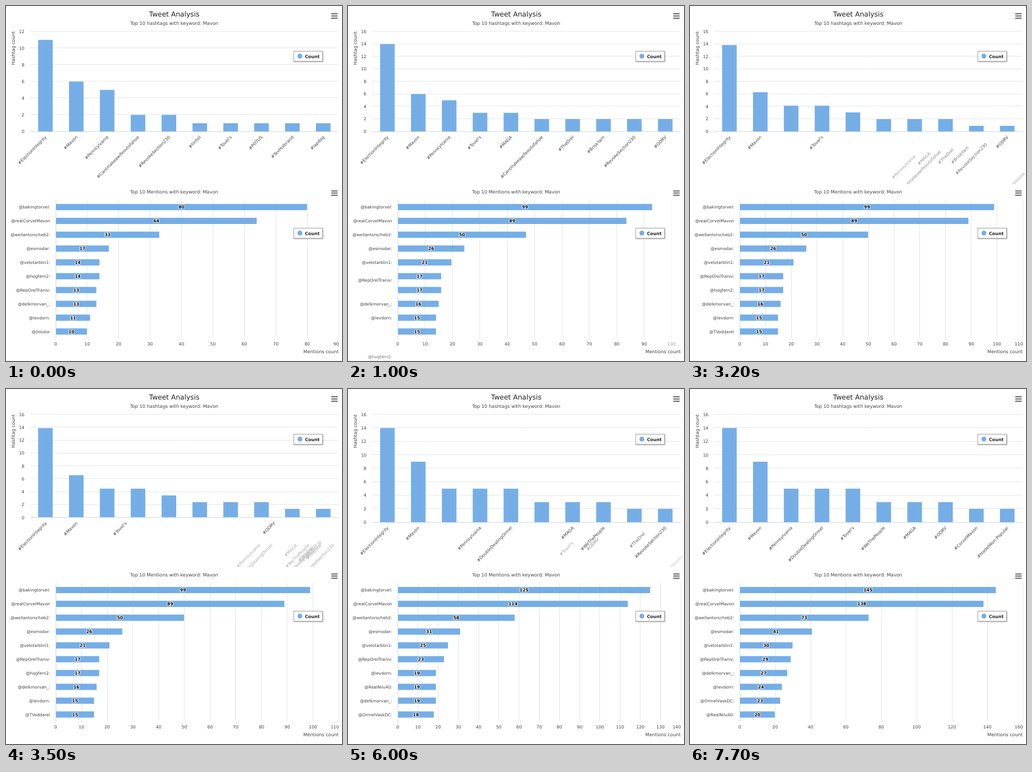
Write an HTML page with a canvas that moves like this. It is 608 by 640 pixels and loops after 8000 ms.

```html
<!DOCTYPE html>
<html lang="en">
<head>
<meta charset="utf-8">
<title>Tweet Analysis</title>
<style>
html, body { margin: 0; width: 100%; height: 100%; overflow: hidden; background: #fff; }
canvas { display: block; width: 608px; height: 640px; }
</style>
</head>
<body>
<canvas id="stage"></canvas>
<script>
const W = 608, H = 640, LOOP = 8000;
const BLUE = '#75aee7', GRID = '#e6e6e6', AXIS = '#ccd6eb', INK = '#404040';
const FONT = '"DejaVu Sans", Verdana, sans-serif';
const LEFT = 43.4, RIGHT = 602, TOP = 45.7, SLOT = (RIGHT - LEFT) / 10;
const ROW_LEFT = 90, ROW_TOP = 350, ROW = 24.93, ROW_END = 599;

const canvas = document.getElementById('stage');
const ctx = canvas.getContext('2d');
const dpr = window.devicePixelRatio || 1;
canvas.width = W * dpr;
canvas.height = H * dpr;

// Each state: labels, values, axis maximum and step; fresh labels re-enter instead of sliding.
const tags = [
  { names: '#ElectionIntegrity,#Mavon,#Pennsylvania,#Cantmakeawifeoutofahoe,#RevokeSection230,#tinfoil,#Tovel\'s,#POTUS,#TevHolbrand,#lapdog',
    values: [11, 6, 5, 2, 2, 1, 1, 1, 1, 1], max: 12, step: 2, base: 226 },
  { names: '#ElectionIntegrity,#Mavon,#Pennsylvania,#Tovel\'s,#MAGA,#Cantmakeawifeoutofahoe,#TheDrel,#BriskYarn,#RevokeSection230,#ODRV',
    values: [14, 6, 5, 3, 3, 2, 2, 2, 2, 2], max: 16, step: 2, base: 226 },
  { names: '#ElectionIntegrity,#Mavon,#Tovel\'s,#Pennsylvania,#DoubleDealingOrmel,#ODRV,#MAGA,#WeThePeople,#TheDrel,#RevokeSection230',
    values: [14, 7, 5, 5, 4, 3, 3, 3, 2, 2], max: 16, step: 2, base: 240,
    fresh: '#Pennsylvania,#MAGA,#TheDrel,#RevokeSection230' },
  { names: '#ElectionIntegrity,#Mavon,#Pennsylvania,#DoubleDealingOrmel,#Tovel\'s,#WeThePeople,#MAGA,#ODRV,#CorvelMavon,#HadelWon Popular',
    values: [14, 9, 5, 5, 5, 3, 3, 3, 2, 2], max: 16, step: 2, base: 240,
    fresh: '#Tovel\'s,#ODRV' }
];
const mentions = [
  { names: '@bakingtorvel:,@realCorvelMavon,@wellantorscheb2:,@esmodar:,@velotarblin1:,@hogfern2:,@RepOrelTraniv:,@delkmorvan_:,@levdorn:,@jhlodor',
    values: [80, 64, 33, 17, 14, 14, 13, 13, 11, 10], max: 90, step: 10 },
  { names: '@bakingtorvel:,@realCorvelMavon,@wellantorscheb2:,@esmodar:,@velotarblin1:,@RepOrelTraniv:,@hogfern2:,@delkmorvan_:,@levdorn:,@TVoddarel',
    values: [99, 89, 50, 26, 21, 17, 17, 16, 15, 15], max: 110, step: 10, fresh: '@hogfern2:' },
  { names: '@bakingtorvel:,@realCorvelMavon,@wellantorscheb2:,@esmodar:,@velotarblin1:,@RepOrelTraniv:,@levdorn:,@RealNilu40:,@delkmorvan_:,@OrmelVaskDC:',
    values: [125, 114, 58, 31, 25, 23, 19, 19, 19, 18], max: 140, step: 10 },
  { names: '@bakingtorvel:,@realCorvelMavon,@wellantorscheb2:,@esmodar:,@velotarblin1:,@RepOrelTraniv:,@delkmorvan_:,@levdorn:,@OrmelVaskDC:,@RealNilu40:',
    values: [145, 138, 73, 41, 30, 29, 27, 24, 23, 20], max: 160, step: 20 }
];
for (const s of [...tags, ...mentions]) {
  s.names = s.names.split(',');
  s.fresh = (s.fresh || '').split(',');
}

// Updates: start time, then progress at each 100 ms tick.
const tagUpdates = [
  [600, [0, .2, .6, .9, 1]],
  [3200, [0, .12, .25, .4, .4, .85, 1]],
  [6000, [0, .3, .3, .75, 1]]
];
const mentionUpdates = [
  [700, [0, .15, .42, .71, .92, 1]],
  [3700, [.05, .35, .8, 1]],
  [6300, [.15, .65, 1]]
];

const lerp = (a, b, p) => a + (b - a) * p;

function stateAt(t, states, updates) {
  let k = 0, p = 1;
  updates.forEach(([start, steps], i) => {
    if (t < start) return;
    k = i + 1;
    p = steps[Math.min(steps.length - 1, Math.floor((t - start) / 100))];
  });
  return { prev: states[Math.max(0, k - 1)], next: states[k], p };
}

function text(str, x, y, size, { align = 'center', color = INK, bold = false, halo = false, angle = 0, alpha = 1 } = {}) {
  ctx.save();
  ctx.globalAlpha = alpha;
  ctx.translate(x, y);
  ctx.rotate(angle);
  ctx.font = `${bold ? 'bold ' : ''}${size}px ${FONT}`;
  ctx.textAlign = align;
  if (halo) {
    ctx.lineWidth = 2;
    ctx.lineJoin = 'round';
    ctx.strokeStyle = '#fff';
    ctx.strokeText(str, 0, 0);
  }
  ctx.fillStyle = color;
  ctx.fillText(str, 0, 0);
  ctx.restore();
}

function line(x1, y1, x2, y2, color, alpha = 1) {
  ctx.globalAlpha = alpha;
  ctx.strokeStyle = color;
  ctx.lineWidth = 1;
  ctx.beginPath();
  ctx.moveTo(x1, y1);
  ctx.lineTo(x2, y2);
  ctx.stroke();
  ctx.globalAlpha = 1;
}

const crisp = v => Math.floor(v) + .5;

function clipped(x, y, w, h, draw) {
  ctx.save();
  ctx.beginPath();
  ctx.rect(x, y, w, h);
  ctx.clip();
  draw();
  ctx.restore();
}

// Calls draw(value, alpha) for every tick of both axes.
function eachTick({ prev, next, p }, draw) {
  const has = (s, v) => v <= s.max && v % s.step === 0;
  for (let v = 0; v <= Math.max(prev.max, next.max); v += prev.step) {
    const before = has(prev, v), after = has(next, v);
    const alpha = before && after ? 1 : after ? p * p : before ? 1 - p : 0;
    if (alpha > 0) draw(v, alpha);
  }
}

// Calls draw(name, from, to, progress, alpha); null stands for off the axis.
function eachLabel({ prev, next, p }, draw) {
  const kept = n => prev.names.includes(n) && next.names.includes(n) && !next.fresh.includes(n);
  if (p < 1) prev.names.forEach((n, i) => {
    if (kept(n)) return;
    const q = Math.min(1, p + .2 * Math.sqrt(9 - i));
    if (q < 1) draw(n, i, null, q, 1 - q);
  });
  next.names.forEach((n, i) => {
    if (p === 1) draw(n, i, i, 1, 1);
    else if (kept(n)) draw(n, prev.names.indexOf(n), i, p, 1);
    else draw(n, null, i, p, lerp(.08, 1, p));
  });
}

function legend(y) {
  ctx.save();
  ctx.shadowColor = 'rgba(0,0,0,.35)';
  ctx.shadowBlur = 2 * dpr;
  ctx.shadowOffsetX = ctx.shadowOffsetY = dpr;
  ctx.fillStyle = '#fff';
  ctx.fillRect(520.3, y, 52.7, 18.7);
  ctx.restore();
  ctx.strokeStyle = '#a0a0a0';
  ctx.lineWidth = 1;
  ctx.strokeRect(520.8, y + .5, 51.9, 18.2);
  ctx.fillStyle = BLUE;
  ctx.beginPath();
  ctx.arc(531.8, y + 9.3, 4.4, 0, 7);
  ctx.fill();
  text('Count', 541, y + 12.6, 8, { align: 'left', bold: true, color: '#222' });
}

function menu(y) {
  ctx.strokeStyle = '#666';
  ctx.lineWidth = 2;
  ctx.lineCap = 'round';
  for (const dy of [-3.9, 0, 3.9]) {
    ctx.beginPath();
    ctx.moveTo(589.3, y + dy);
    ctx.lineTo(599.3, y + dy);
    ctx.stroke();
  }
  ctx.lineCap = 'butt';
}

function drawTags(state) {
  const { prev, next, p } = state;
  const base = lerp(prev.base, next.base, p);
  const yOf = (s, v) => s.base - v / s.max * (s.base - TOP);

  eachTick(state, (v, alpha) => {
    const y = lerp(yOf(prev, v), yOf(next, v), p);
    if (y < TOP - 4) return;
    line(LEFT, crisp(y), RIGHT, crisp(y), GRID, alpha);
    text(v, 33.3, y + 3, 7.8, { align: 'right', alpha });
  });

  clipped(LEFT, TOP, RIGHT - LEFT, base - TOP, () => {
    ctx.fillStyle = BLUE;
    next.values.forEach((v, i) => {
      const y = yOf(next, v) + .4;
      ctx.fillRect(LEFT + SLOT * (i + .5) - 13.2, y, 26.4, next.base - y);
    });
  });
  line(LEFT, crisp(base), RIGHT, crisp(base), AXIS);

  const spot = (i, s) => i === null
    ? [606.5, next.base + 63]
    : [LEFT + SLOT * (i + .5) + 2.7, s.base + 11];
  clipped(0, 0, W, 321, () => eachLabel(state, (name, from, to, q, alpha) => {
    const a = spot(from, prev), b = spot(to, next);
    text(name, lerp(a[0], b[0], q), lerp(a[1], b[1], q), 7.7,
      { align: 'right', angle: -Math.PI / 4, alpha });
  }));

  text('Tweet Analysis', 304.4, 19.3, 12.45, { color: '#222' });
  text('Top 10 hashtags with keyword: Mavon', 304.4, 34.2, 8.36);
  text('Hashtag count', 16.3, 45.8, 8.3, { align: 'right', angle: -Math.PI / 2 });
  legend(81);
  menu(18);
}

function drawMentions(state) {
  const { prev, next, p } = state;
  const xOf = (s, v) => ROW_LEFT + v / s.max * (RIGHT - ROW_LEFT);
  const rowY = i => i === null ? 926 : ROW_TOP + ROW * (i + .5);

  eachTick(state, (v, alpha) => {
    const x = lerp(xOf(prev, v), xOf(next, v), p);
    if (x > RIGHT + 1) return;
    line(crisp(x), ROW_TOP, crisp(x), ROW_END, v ? GRID : AXIS, alpha);
    ctx.font = `7.8px ${FONT}`;
    const half = ctx.measureText(v).width / 2;
    text(v, Math.min(x, 602.4 - half), 612.2, 7.8, { alpha });
  });

  next.values.forEach((v, i) => {
    const end = xOf(next, v), y = rowY(i);
    ctx.fillStyle = BLUE;
    ctx.fillRect(ROW_LEFT + .5, y - 5.6, end - ROW_LEFT - 1, 11.2);
    text(v, (ROW_LEFT + end) / 2, y + 3, 7.7, { bold: true, halo: true, color: '#000' });
  });

  eachLabel(state, (name, from, to, q, alpha) =>
    text(name, 79.8, lerp(rowY(from), rowY(to), q) + 2.8, 7.5, { align: 'right', alpha }));

  text('Top 10 Mentions with keyword: Mavon', 304.2, 338.2, 8.36);
  text('Mentions count', 602, 626.3, 8.32, { align: 'right' });
  legend(400);
  menu(337.3);
}

function frame(now) {
  const t = now % LOOP;
  ctx.setTransform(dpr, 0, 0, dpr, 0, 0);
  ctx.textRendering = 'geometricPrecision';
  ctx.fillStyle = '#fff';
  ctx.fillRect(0, 0, W, H);
  drawTags(stateAt(t, tags, tagUpdates));
  drawMentions(stateAt(t, mentions, mentionUpdates));
  requestAnimationFrame(frame);
}
frame(performance.now());
</script>
</body>
</html>
```
